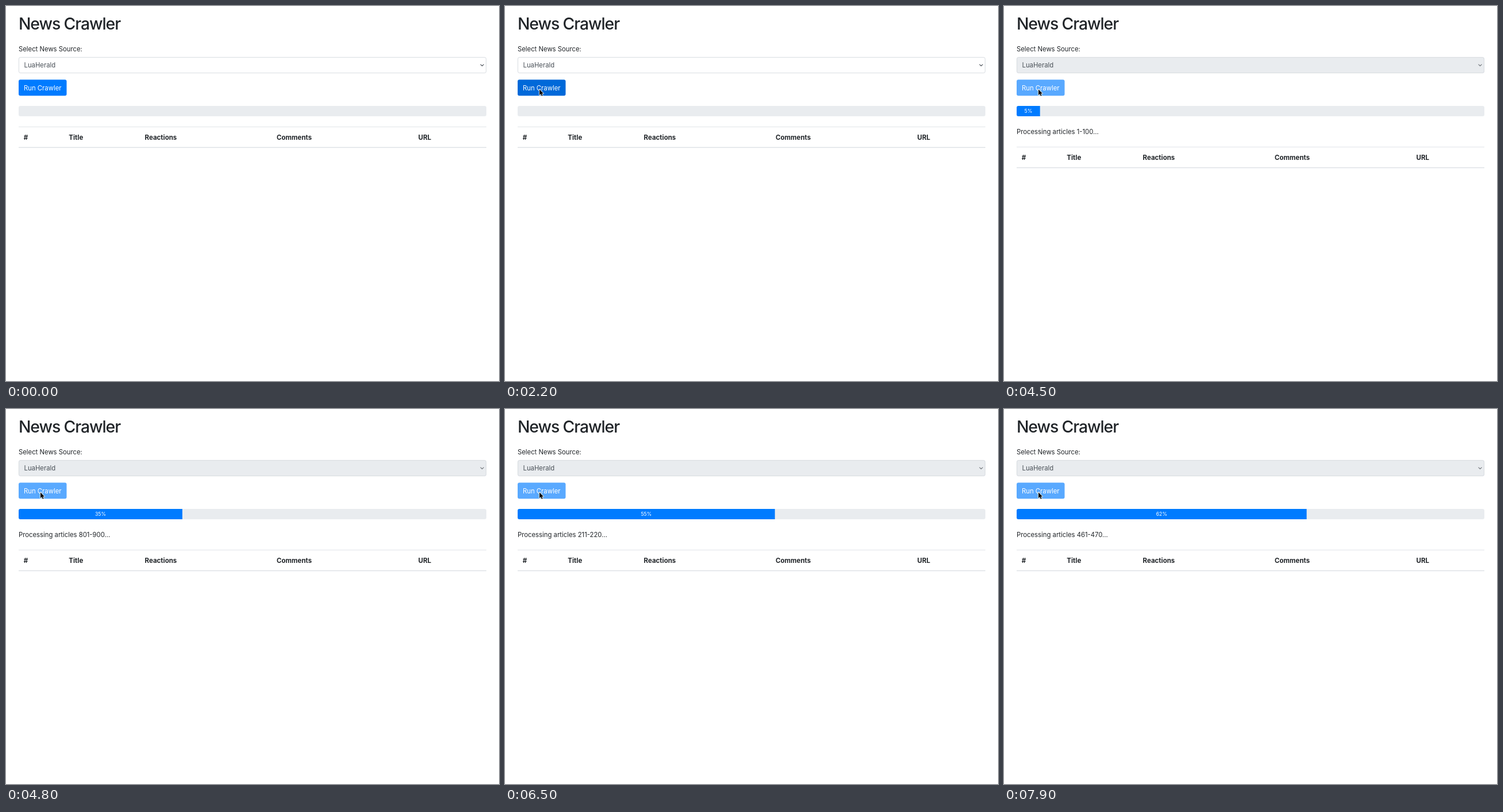
Recreate the animation shown at these times as an HTML page. Size 858x653 px, loop 8000 ms.

```html
<!DOCTYPE html>
<html lang="en">
<head>
<meta charset="utf-8">
<title>News Crawler</title>
<style>
  html, body { margin: 0; width: 100%; height: 100%; overflow: hidden; background: #fff; }
  svg { display: block; width: 858px; height: 653px; }
  text {
    font: 400 11.3px Inter, "Liberation Sans", sans-serif;
    font-optical-sizing: none;
    fill: #212529;
    white-space: pre;
  }
  .heading { font-size: 28.4px; font-weight: 500; letter-spacing: -1.1px; }
  .head text { font-size: 11.5px; font-weight: 700; }
  .head rect { fill: #dee2e6; }
  #choice { fill: #495057; }
  .on-blue { fill: #fff; }
  #percent { font-size: 8.7px; text-anchor: middle; }
</style>
</head>
<body>
<svg viewBox="0 0 858 653">
  <defs>
    <clipPath id="track"><rect x="22" y="174" width="814" height="18" rx="3"/></clipPath>
  </defs>

  <text class="heading" x="22" y="41">News Crawler</text>
  <text x="22" y="78.5">Select News Source:</text>

  <rect id="select" x="22.4" y="89.4" width="813.2" height="27.2" rx="2.8" stroke="#ced4da" stroke-width=".8"/>
  <text id="choice" x="31.5" y="107">LuaHerald</text>
  <path id="chevron" d="M826 101.8l2.6 2.6 2.6-2.6" fill="none" stroke-width="1.2" stroke-linecap="round" stroke-linejoin="round"/>

  <rect id="button" x="22" y="128.3" width="83.5" height="28" rx="3"/>
  <text class="on-blue" x="31" y="146.6">Run Crawler</text>

  <g clip-path="url(#track)">
    <rect x="22" y="174" width="814" height="18" fill="#e9ecef"/>
    <rect id="bar" x="22" y="174" height="18" fill="#007bff"/>
  </g>
  <text id="percent" class="on-blue" y="186.3"></text>
  <text id="message" x="22" y="223"></text>

  <g id="head" class="head">
    <rect x="22" y="210" width="814" height=".9"/>
    <text x="30.7" y="232.5">#</text>
    <text x="109.3" y="232.5">Title</text>
    <text x="241.5" y="232.5">Reactions</text>
    <text x="471" y="232.5">Comments</text>
    <text x="717.5" y="232.5">URL</text>
    <rect x="22" y="245.6" width="814" height="1.5"/>
  </g>

  <path id="cursor" d="M0 0V10L2.3 7.9 3.9 11.6 5.6 10.9 4 7.3H7Z" fill="#000" stroke="#fff" stroke-width="1.6" stroke-linejoin="round" paint-order="stroke"/>
</svg>

<script>
const LOOP = 8000, TICK = 100, TOTAL = 1200;
const DISABLED = 2700, STARTED = 3000, SCANNING = 4500, SCANNED = 5100, READING = 5300;
const MOVE = { from: 1300, to: 2200, x0: 791, y0: 239, x1: 60, y1: 145.2 };

const el = id => document.getElementById(id);
const set = (id, attrs) => {
  for (const name in attrs) el(id).setAttribute(name, attrs[name]);
};

// Ties go to the even number.
function roundEven(n) {
  const low = Math.floor(n);
  return n - low === 0.5 ? low + low % 2 : Math.round(n);
}

// Piecewise linear value through [time, value] points.
function along(points, t) {
  const i = Math.max(1, points.findIndex(p => p[0] >= t));
  const [t0, v0] = points[i - 1], [t1, v1] = points[i];
  return v0 + (v1 - v0) * (t - t0) / (t1 - t0);
}

const batch = (start, size) => `Processing articles ${start + 1}-${start + size}...`;

function progress(t) {
  if (t < STARTED) return { percent: 0, message: "" };
  if (t < SCANNING) return { percent: 5, message: "Fetching article URLs from sitemaps..." };
  if (t < SCANNED) {
    const start = Math.min(TOTAL - 100, Math.floor((t - SCANNING) / 300 * 8) * 100);
    return { percent: roundEven(5 + 45 * start / TOTAL), message: batch(start, 100) };
  }
  if (t < READING) return { percent: 50, message: "Fetching reactions and comments..." };
  const done = along([[READING, 0], [5800, 80], [7200, 340], [7900, 460]], t);
  const start = Math.floor(done / 10 + 1e-6) * 10;
  return { percent: roundEven(50 + 30 * start / TOTAL), message: batch(start, 10) };
}

function cursorAt(t) {
  const p = Math.min(1, Math.max(0, (t - MOVE.from) / (MOVE.to - MOVE.from)));
  const left = (1 - p) ** 3;
  return {
    x: MOVE.x1 + (MOVE.x0 - MOVE.x1) * left,
    y: MOVE.y1 + (MOVE.y0 - MOVE.y1) * left
  };
}

function render(t) {
  const disabled = t >= DISABLED;
  const { x, y } = cursorAt(t);
  const hover = x < 105.5 && y < 156.3;
  set("cursor", {
    transform: `translate(${x} ${y})`,
    visibility: t < MOVE.from ? "hidden" : "visible"
  });
  set("select", { fill: disabled ? "#e9ecef" : "#fff" });
  set("chevron", { stroke: disabled ? "#70757a" : "#495057" });
  set("button", { fill: disabled ? "#59a9ff" : hover ? "#0069d9" : "#007bff" });

  const { percent, message } = progress(t);
  const width = 814 * percent / 100;
  set("bar", { width });
  set("percent", { x: 22 + width / 2 });
  el("percent").textContent = percent ? percent + "%" : "";
  el("message").textContent = message;
  set("head", { transform: `translate(0 ${message ? 35.2 : 0})` });
}

function frame() {
  render(Math.floor(performance.now() % LOOP / TICK) * TICK);
  requestAnimationFrame(frame);
}
frame();
</script>
</body>
</html>
```
